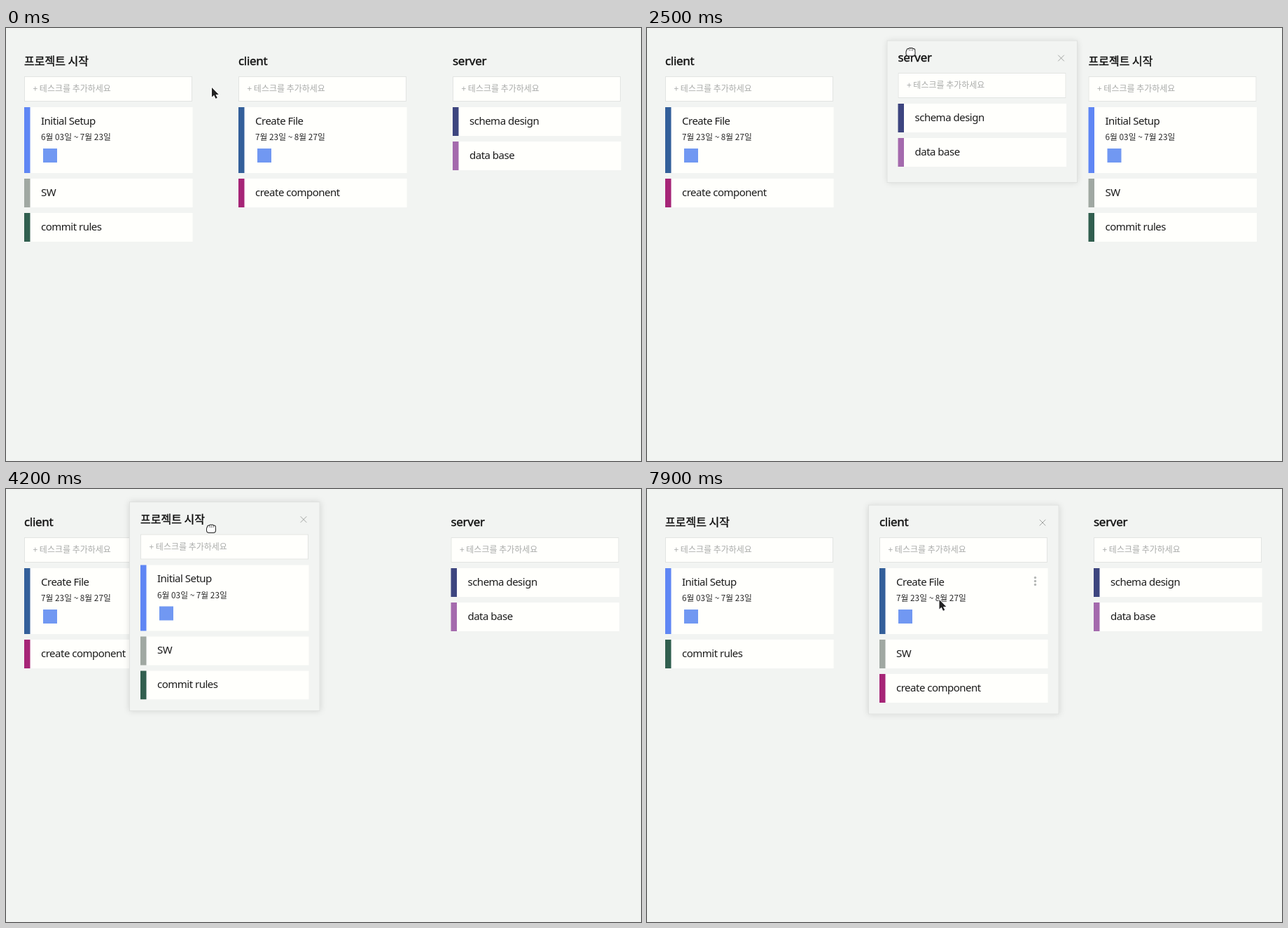
Recreate the animation shown at these times as an HTML page with a canvas. Size 907 by 618 pixels, loop 8000 ms.

```html
<!DOCTYPE html>
<html lang="ko">
<head>
<meta charset="utf-8">
<style>
html, body { margin: 0; width: 100%; height: 100%; overflow: hidden; background: #f2f4f2; }
canvas { display: block; }
</style>
</head>
<body>
<canvas></canvas>
<script>
const W = 907, H = 618, LOOP = 8000, STEP = 100, DROP = 330;
const BG = '#f2f4f2', WHITE = '#fffffc';
const LATIN = '"Noto Sans", sans-serif';
const HANGUL = '"Noto Sans CJK KR", "Noto Sans CJK JP", "Noto Sans CJK", sans-serif';
const canvas = document.querySelector('canvas');
const g = canvas.getContext('2d');
const dpr = window.devicePixelRatio || 1;
canvas.width = W * dpr;
canvas.height = H * dpr;
canvas.style.width = W + 'px';
canvas.style.height = H + 'px';

// Mouse path: arrival time, x, y, pause
const mouse = [
  [0, 294, 85, 200], [400, 178, 42, 200], [800, 215, 50], [900, 262, 51],
  [1100, 401, 44], [1300, 483, 42, 200], [1700, 650, 40], [1800, 656, 39],
  [1900, 650, 39], [2400, 420, 35], [2600, 333, 33, 100], [2800, 319, 30],
  [2900, 366, 30], [3450, 739, 61, 250], [3900, 690, 59], [4200, 293, 56.5],
  [4400, 276, 58, 200], [5000, 150, 63], [5300, 124, 147, 200],
  [5700, 131, 191, 100], [6000, 125, 238, 100], [6400, 349, 219],
  [6600, 565, 203], [6700, 586, 203], [7400, 440, 224, 100],
  [7600, 440, 229, 100], [7900, 417.5, 158],
];

const drags = [
  { id: 'start', from: 700, to: 1200, grab: [151, 42.5], home: [332, 0] },
  { id: 'server', from: 1900, to: 2800, grab: [18, 39], home: [332, 0] },
  { id: 'start', from: 3800, to: 5000, grab: [101, 61], home: [26, 0] },
  { id: 'sw', from: 6200, to: 6750, grab: [103, 26], home: [332, 215] },
];

// Resting places: start time, value
const slots = {
  start: [[0, 26], [1200, 332], [2350, 638], [5000, 26]],
  client: [[0, 332], [1000, 26], [4810, 332]],
  server: [[0, 638], [2800, 332], [4030, 638]],
};
const commitY = [[0, 264], [6244, 215]];
const componentY = [[0, 215], [6334, 264]];
const clientEnd = [[0, 256], [6349, 305]];

const cards = {
  setup: { text: 'Initial Setup', color: '#5f86f4', date: '6월 03일 ~ 7월 23일' },
  sw: { text: 'SW', color: '#a0a8a2' },
  commit: { text: 'commit rules', color: '#315f4f' },
  file: { text: 'Create File', color: '#335f9a', date: '7월 23일 ~ 8월 27일' },
  component: { text: 'create component', color: '#a62577' },
  schema: { text: 'schema design', color: '#3d457f' },
  data: { text: 'data base', color: '#a46aad' },
};
const titles = { start: '프로젝트 시작', client: 'client', server: 'server' };

const mix = (a, b, p) => a + (b - a) * p;

// cubic-bezier(.2, 0, 0, 1)
function ease(x) {
  if (x <= 0) return 0;
  if (x >= 1) return 1;
  let lo = 0, hi = 1;
  for (let i = 0; i < 20; i++) {
    const s = (lo + hi) / 2;
    if (0.6 * (1 - s) ** 2 * s + s ** 3 < x) lo = s; else hi = s;
  }
  return 3 * (1 - lo) * lo * lo + lo ** 3;
}

const slide = (keys, t) =>
  keys.reduce((v, [at, to], i) => i ? mix(v, to, ease((t - at) / 200)) : to, 0);

function mouseAt(t) {
  const i = mouse.findIndex(k => k[0] > t);
  if (i < 0) return mouse[mouse.length - 1].slice(1, 3);
  const [t0, x0, y0, pause = 0] = mouse[i - 1], [t1, x1, y1] = mouse[i];
  const p = Math.max(0, (t - t0 - pause) / (t1 - t0 - pause));
  return [mix(x0, x1, p), mix(y0, y1, p)];
}

function dragPos(d, t) {
  const m = mouseAt(Math.min(t, d.to));
  const p = ease((t - d.to) / DROP);
  return [0, 1].map(i => mix(m[i] - d.grab[i], d.home[i], p));
}

function text(str, x, y, size, family, color, spacing = 0) {
  g.font = `400 ${size}px ${family}`;
  g.letterSpacing = spacing + 'px';
  g.fillStyle = color;
  g.fillText(str, x, y);
}

function rect(x, y, w, h, color) {
  g.fillStyle = color;
  g.fillRect(x, y, w, h);
}

function card(id, x, y, dots) {
  const c = cards[id], h = c.date ? 94 : 41;
  rect(x, y, 240.5, h, WHITE);
  rect(x, y, 8.5, h, c.color);
  text(c.text, x + 24, y + 24.5, 15, LATIN, '#1c1c1c', -0.5);
  if (c.date) {
    text(c.date, x + 24, y + 47, 11.8, HANGUL, '#2a2a2a');
    rect(x + 27, y + 59, 20, 20, '#7198f2');
  }
  if (dots) {
    g.fillStyle = '#b4b6b4';
    for (let i = -1; i < 2; i++) {
      g.beginPath();
      g.arc(x + 222.5, y + 18.5 + i * 5, 1.7, 0, 7);
      g.fill();
    }
  }
}

function column(col, active, m) {
  const { id, x, y, list, end } = col;
  if (active) {
    g.save();
    g.shadowColor = 'rgba(0,0,0,.13)';
    g.shadowBlur = 9 * dpr;
    rect(x - 16, y + 22.5, 272.5, col.h, BG);
    g.restore();
    g.strokeStyle = '#e0e2e0';
    g.lineWidth = 1;
    g.strokeRect(x - 15.5, y + 23, 271.5, col.h - 1);
    g.strokeStyle = '#a2a4a2';
    g.beginPath();
    for (const s of [-4.3, 4.3]) {
      g.moveTo(x + 228.7, y + 48 - s);
      g.lineTo(x + 237.3, y + 48 + s);
    }
    g.stroke();
  }
  const latin = id !== 'start';
  text(titles[id], x, y + 53, latin ? 17 : 16, latin ? LATIN : HANGUL, '#111', latin ? -0.3 : 0);
  g.strokeStyle = '#111';
  g.lineWidth = 0.4;
  g.strokeText(titles[id], x, y + 53);

  rect(x, y + 69, 240, 36, WHITE);
  g.strokeStyle = '#e2e4e2';
  g.lineWidth = 1;
  g.strokeRect(x + 0.5, y + 69.5, 239, 35);
  text('+ 테스크를 추가하세요', x + 12.5, y + 91.3, 12, HANGUL, '#a9aba9');

  g.save();
  g.beginPath();
  g.rect(x - 1, y + 105, 243, end - 105);
  g.clip();
  for (const [name, cy] of list) {
    const h = cards[name].date ? 94 : 41;
    const over = m && m[0] > x && m[0] < x + 240 && m[1] > cy && m[1] < cy + h;
    card(name, x, y + cy, over);
  }
  g.restore();
}

const arrow = new Path2D('M0 0V13.5L3.1 10.8L5.5 15.8L7.8 14.8L5.5 9.9H9.8Z');
const pointer = new Path2D();
pointer.roundRect(-1.7, 0.6, 3.4, 10, 1.7);
pointer.roundRect(-4.5, 6, 12, 7.5, 3);
const grip = new Path2D();
grip.roundRect(-6, -2.5, 12, 8, 3);
for (let i = 0; i < 4; i++) grip.roundRect(-5 + i * 2.6, -5 + (i % 3 ? 0 : 1), 3, 6, 1.5);

// The outline is stroked first so that joined parts show only their outer edge
function cursor(shape, [x, y]) {
  const dark = shape === arrow;
  g.save();
  g.translate(x, y);
  g.lineJoin = 'round';
  g.lineWidth = 2;
  g.strokeStyle = dark ? '#fff' : '#222';
  g.fillStyle = dark ? '#222' : '#fff';
  g.stroke(shape);
  g.fill(shape);
  if (!dark) {
    const [left, top] = shape === grip ? [-2.2, -3.6] : [2, 6];
    for (let i = 0; i < 3; i++) rect(left + i * 2.4, top, 0.8, 2.2, '#444');
  }
  g.restore();
}

function draw(t) {
  g.setTransform(dpr, 0, 0, dpr, 0, 0);
  rect(0, 0, W, H, BG);
  const m = mouseAt(t);
  const drag = drags.find(d => t >= d.from && t < d.to + DROP);
  const held = drag && t < drag.to;
  const swDrag = drags[3];
  const swLeft = t >= swDrag.from, swLanded = t >= swDrag.to + DROP;

  const cols = [
    { id: 'start', end: swLeft ? 264 : 305,
      list: [['setup', 113], ...(swLeft ? [] : [['sw', 215]]), ['commit', slide(commitY, t)]] },
    { id: 'client', end: slide(clientEnd, t),
      list: [['file', 113], ...(swLanded ? [['sw', 215]] : []), ['component', slide(componentY, t)]] },
    { id: 'server', end: 203, list: [['schema', 113], ['data', 162]] },
  ];
  for (const c of cols) {
    c.x = slide(slots[c.id], t);
    c.y = 0;
    c.h = Math.max(203.5, c.end - 6);
    if (drag && drag.id === c.id) [c.x, c.y] = dragPos(drag, t);
  }

  const colDrag = drag && drag.id !== 'sw';
  const active = cols.find(c => colDrag ? c.id === drag.id :
    m[0] > c.x - 16 && m[0] < c.x + 257 && m[1] > 22 && m[1] < 22 + c.h);
  for (const c of cols) if (c !== active) column(c);
  if (active) column(active, true, !drag && m);
  if (drag && !colDrag) card('sw', ...dragPos(drag, t));

  const onHeader = !drag && active && m[1] < 69;
  cursor(held ? grip : onHeader ? pointer : arrow, m);
}

function tick() {
  draw(Math.floor(performance.now() % LOOP / STEP) * STEP);
  requestAnimationFrame(tick);
}
tick();
</script>
</body>
</html>
```
